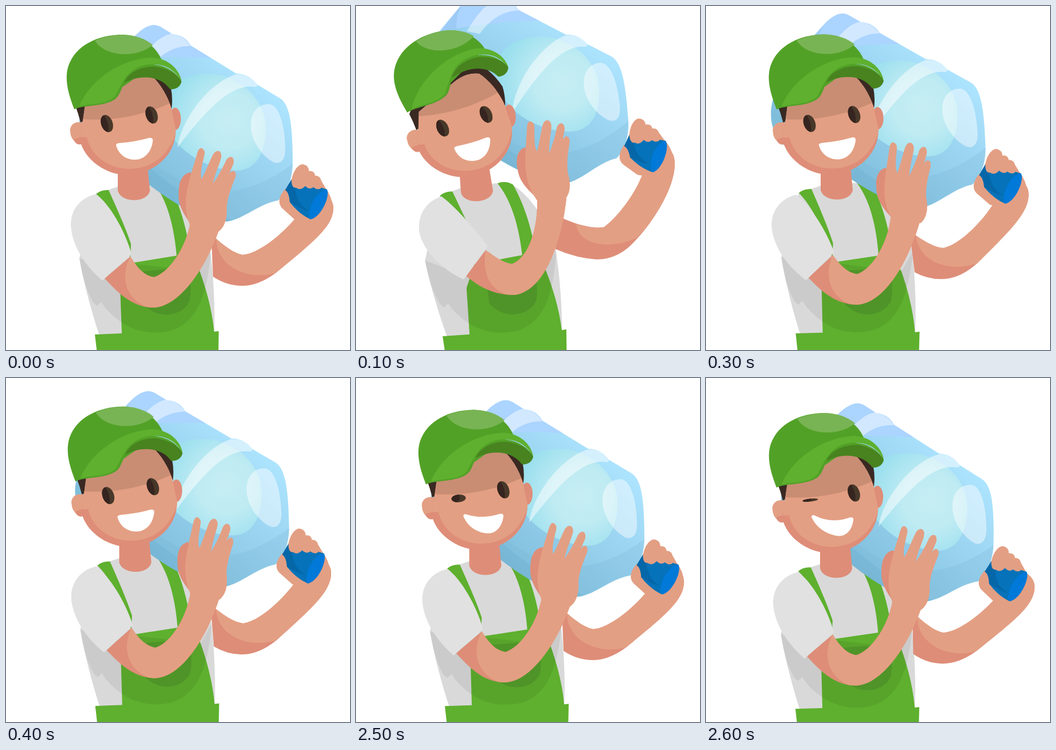
Animation, 600 px wide and 600 px high, one loop 2700 ms. Source, as an HTML page:

```html
<!DOCTYPE html>
<html lang="en">
<head>
<meta charset="utf-8">
<title>Water delivery</title>
<style>
html, body { margin: 0; width: 100%; height: 100%; overflow: hidden; background: #fff; }
svg { display: block; width: 100%; height: 100%; }
.skin { fill: #e39f83; }
.blush { fill: #de8d78; }
.green { fill: #5eb02e; }
.hair { fill: #3a2922; }
</style>
</head>
<body>
<svg viewBox="0 0 600 600">
  <defs>
    <linearGradient id="water" gradientUnits="userSpaceOnUse" x1="455" y1="130" x2="270" y2="330">
      <stop offset="0" stop-color="#aee5ff"/><stop offset=".4" stop-color="#9cd5f2"/><stop offset="1" stop-color="#7fbedb"/>
    </linearGradient>
    <radialGradient id="core" gradientUnits="userSpaceOnUse" cx="390" cy="200" r="110">
      <stop offset="0" stop-color="#c6edf3"/><stop offset=".45" stop-color="#bfebf3"/><stop offset="1" stop-color="#99dfee"/>
    </radialGradient>
    <clipPath id="bottleClip"><use href="#bottleShape"/></clipPath>
    <clipPath id="faceClip"><use href="#faceShape"/></clipPath>
    <clipPath id="eyeClip"><ellipse rx="10" ry="15.5"/></clipPath>
    <g id="eye">
      <ellipse rx="10" ry="15.5" fill="#483829"/>
      <path clip-path="url(#eyeClip)" d="M-12,-16 L0,-16 Q5,2 -4,16 L-12,16Z" fill="#35241f"/>
    </g>
  </defs>

  <g id="torso">
    <path fill="#d9d9d9" d="M157,328 L195,315 L255,309 L283,312 C318,333 345,385 356,425 C362,470 365,530 363,575 L163,575 C148,530 135,480 128,440Z"/>
    <path class="green" d="M157,328 Q166,320 179,321 C192,350 208,385 218,415 L217,440 C203,395 180,350 157,328Z"/>
    <path class="green" d="M258,309 Q272,304 285,312 C303,345 318,395 322,442 L298,440 C295,400 286,345 258,309Z"/>
    <path class="green" d="M199,490 L214,449 L300,435 L337,460 C351,498 360,535 363,568 L371,567 L370,640 L163,640 L155,573 L202,571Z"/>
    <path fill="#000" opacity=".065" d="M128,440 L200,470 L214,449 L338,462 L357,428 C351,510 330,555 285,567 C250,574 222,566 202,552 Q178,536 166,516 L159,523 L152,517 C140,495 132,470 128,440Z"/>
    <path fill="#4f9428" d="M232,464 Q275,458 320,458 Q324,500 320,515 C305,545 260,546 238,518Z"/>
  </g>

  <g id="bottle">
    <path id="bottleShape" fill="url(#water)" d="M184,95 L224,53 Q250,26 269,36 L290,49 Q312,51 322,69 L402,118 Q424,118 438,137 L478,161 C497,173 500,215 500,277 Q498,318 475,339 C440,345 415,372 385,376 C345,372 305,354 250,312 L150,260 C115,225 118,170 184,95Z"/>
    <g clip-path="url(#bottleClip)">
      <path fill="#abd4ff" d="M100,99 L184,97 Q280,85 365,91 L340,0 L100,0Z"/>
      <path fill="#8bbfe8" opacity=".45" d="M184,97 L225,53 Q212,72 212,94Z"/>
      <path fill="#77b4d2" opacity=".25" d="M230,255 C300,310 340,323 385,323 C430,320 470,298 505,272 L505,400 L200,400Z"/>
      <path fill="#66a9c7" opacity=".25" d="M220,255 C280,310 330,345 400,376 L300,390 L200,320Z"/>
    </g>
    <path fill="url(#core)" d="M278,165 C285,125 330,115 365,119 C410,125 455,165 453,215 C452,265 430,288 400,287 C350,287 262,240 278,165Z"/>
    <g fill="#fff">
      <path opacity=".5" d="M299,247 C306,195 358,131 402,119 Q424,118 438,137 Q439,142 432,141 C392,136 350,180 299,247Z"/>
      <path opacity=".45" d="M230,100 Q262,52 290,48 Q311,52 322,70 C295,69 272,82 252,106Z"/>
      <path opacity=".45" d="M458,171 C478,171 487,215 487,250 C487,270 478,276 468,273 C452,266 427,240 427,208 C427,185 440,171 458,171Z"/>
    </g>
  </g>

  <g id="backArm"><path class="blush"/><path class="skin"/></g>
  <g id="fist">
    <path class="skin" d="M486,320 C475,333 474,345 482,353 L504,373 L540,385 L570,352 Q569,333 557,317 L549,303 L510,300Z"/>
    <path fill="#0572b9" d="M499,301 L487,321 Q494,325 495,342 Q510,362 531,372 L560,320Z"/>
    <path fill="#0567a8" d="M499,301 L487,321 Q494,325 495,342 Q515,355 528,357 Q500,342 505,302Z"/>
    <path fill="#0079d8" d="M531,372 C522,362 539,321 560,320 C566,333 548,370 531,372Z"/>
    <path class="skin" d="M498,304 C500,290 508,277 517,276 C526,277 529,284 528,288 C535,287 539,291 539,296 C546,295 551,302 549,307 Q554,313 549,318 C544,321 540,319 536,316 C530,321 525,317 522,314 C514,322 509,319 506,317 Q498,318 498,304Z"/>
  </g>

  <path id="neck" class="blush" d="M195,280 L195,322 C200,344 247,344 251,322 L247,280Z"/>
  <g id="head">
    <path class="skin" d="M136,204 C119,198 110,210 112,219 C113,232 119,234 121,238 L145,230Z"/>
    <path class="blush" d="M118,233 Q127,228 142,229 L138,238 Q127,245 121,238Z"/>
    <ellipse class="blush" cx="295" cy="197" rx="10" ry="19.5"/>
    <path class="hair" d="M121,174 Q126,187 130,203 L135,201 L150,185 L285,180 L289,178 Q291,160 288,145 Q270,110 240,95 L150,120Z"/>
    <path id="faceShape" class="blush" d="M138,172 L134,200 Q128,220 130,238 C139,268 172,294 212,295 C258,293 297,260 296,215 L288,177 C281,155 268,133 250,118 Q225,112 198,132Z"/>
    <path class="skin" clip-path="url(#faceClip)" d="M130,190 L130,229 L141,229 C148,262 180,284 215,284 C258,284 290,255 298,212 L290,100 L130,100Z"/>
    <g clip-path="url(#faceClip)"><path id="shade" fill="#000" opacity=".115" d="M120,196 C180,204 245,191 300,163 L300,80 L120,80Z"/></g>
    <use id="wink" href="#eye"/>
    <use href="#eye" transform="translate(254 190) rotate(-20)"/>
    <path id="mouth" fill="#fff"/>
  </g>
  <g id="cap">
    <path fill="#52a127" d="M119,180 C107,150 102,125 109,104 C121,69 160,50 203,50 C240,52 262,72 271,93 L205,140Z"/>
    <path fill="#78b453" d="M155,60 C172,89 228,92 256,68 C240,54 217,50 203,50 Q177,51 155,60Z"/>
    <path fill="#52a127" d="M118,180 L128,174 L195,140 L250,102 L306,132 L260,112 L206,134 C199,150 197,160 186,165 C165,176 140,172 118,180Z"/>
    <path class="green" d="M128,175 C143,135 195,92 255,90 C289,92 305,117 306,132 C295,111 277,100 250,102 C211,106 204,134 190,158 C174,173 150,169 128,175Z"/>
    <path fill="#52a127" d="M190,158 C204,134 211,106 250,102 C282,101 300,120 306,132 L260,112 L206,134Z"/>
    <path fill="#48831f" d="M206,134 C213,115 238,104 262,106 C290,111 302,123 306,132 C304,141 296,146 286,145 C272,124 238,117 206,134Z"/>
  </g>

  <g id="frontArm"><path class="blush"/><path class="skin"/></g>
  <path id="sleeve" fill="#e1e1e1"/>
  <g id="hand">
    <path class="blush" d="M322,290 C305,293 300,310 301,335 C303,355 318,375 328,388 L335,320Z"/>
    <path class="skin" d="M328,398 C312,368 312,345 315,325 C319,302 327,280 334,255 Q338,245 343,249 Q348,253 346,260 C342,278 338,292 341,302 C347,292 354,273 361,259 Q367,250 373,254 Q377,258 375,266 C370,282 364,294 361,310 C369,298 378,283 384,269 Q389,261 395,264 Q399,269 396,277 L389,293 Q395,285 399,289 Q402,291 400,299 C394,315 387,330 385,350 Q387,382 370,394Z"/>
  </g>
</svg>
<script>
const el = id => document.getElementById(id);

const pivots = {
  torso: [263, 570], bottle: [400, 200], fist: [525, 338], neck: [223, 322], head: [215, 197],
  shade: [0, 0], cap: [212, 156], hand: [354, 298], frontArm: [0, 0], sleeve: [0, 0], backArm: [361, 440]
};

// Limb outlines: resting, then fully raised.
const limbs = {
  sleeve: [[
    'M157,328 C135,333 113,350 113,382 C115,420 140,455 168,479 L219,433 C207,390 180,345 157,328Z',
    'M149,332 C125,340 108,360 110,392 C115,425 150,460 188,477 L230,418 C210,395 180,355 149,332Z'
  ]],
  frontArm: [[
    'M172,475 C195,500 220,526 258,526 C300,524 345,465 371,392 L322,375 C315,420 285,465 258,473 C240,470 228,455 217,437Z',
    'M192,471 C215,490 240,504 275,504 C325,500 358,420 367,335 L316,335 C318,390 300,440 272,450 C255,448 240,435 226,426Z'
  ], [
    'M217,437 C203,462 200,505 245,525 Q252,526 258,526 C300,524 345,465 371,392 L322,375 C315,420 285,465 258,473 C240,470 228,455 217,437Z',
    'M226,426 C222,455 225,490 262,503 Q269,504 275,504 C325,500 358,420 367,335 L316,335 C318,390 300,440 272,450 C255,448 240,435 226,426Z'
  ]],
  backArm: [[
    'M358,398 L368,407 C385,422 400,432 413,434 C440,432 480,400 504,371 L530,345 L556,328 Q571,338 571,352 C571,385 535,412 470,466 Q440,488 412,488 Q385,488 361,472Z',
    'M350,366 L362,371 C390,383 412,388 432,386 C455,370 485,330 497,300 L515,265 L541,245 Q556,255 556,275 C556,320 515,380 490,406 Q460,442 420,442 Q385,440 348,424Z'
  ], [
    'M367,407 C385,422 400,432 413,434 C440,432 480,400 504,371 L530,345 L556,328 Q571,338 571,352 C571,385 535,412 470,466 C415,480 367,450 367,407Z',
    'M384,380 C400,386 412,388 432,386 C455,370 485,330 497,300 L515,265 L541,245 Q556,255 556,275 C556,320 515,380 490,404 C440,428 387,415 384,380Z'
  ]]
};
const mouths = [
  'M192,243 Q191,240 198,239 Q225,237 250,230 Q257,229 256,236 C253,258 238,269 224,268 C208,268 196,258 192,243Z',
  'M180,232 Q181,226 187,230 Q215,244 246,233 Q254,231 253,238 C250,256 240,266 226,265 C205,262 188,250 180,232Z'
];

// Each part: dx, dy, rotation, vertical scale. Eye: x, y, rotation, scaleX, scaleY.
const rest = {
  torso: [0, 0, 0, 1], bottle: [0, 0, 0, 1], fist: [0, 0, 0, 1], neck: [0, 0, 0, 1], head: [0, 0, 0, 1],
  shade: [0, 0, 0, 1], cap: [0, 0, 0, 1], hand: [0, 0, 0, 1],
  frontArm: [0, 0, 0, 1], sleeve: [0, 0, 0, 1], backArm: [0, 0, 0, 1],
  bend: [0, 0], smile: [0], eye: [176, 205, -20, 1, 1]
};
const raised = { ...rest,
  torso: [-4, 0, -1.6, 1], bottle: [-30, -68, -4, 1], fist: [-17.5, -81, -6.5, 1], neck: [-12, 2, -4, 1],
  head: [-26, 3.5, -6.6, 1], shade: [0, -18, 0, 1], cap: [-35, -9.5, -9.7, 1], hand: [-26.5, -51, -13, 1],
  bend: [1, 1]
};
const settling = { ...rest,
  torso: [1.5, -.5, .8, 1], bottle: [-15, -25, -2, 1], fist: [-10, -27, -1.5, 1], neck: [5, -1, 0, 1],
  head: [4.5, -.5, -.5, 1], cap: [4, -.5, -.5, 1], hand: [-8, -12.5, -8, 1],
  frontArm: [2, 0, 0, 1], sleeve: [2, 0, 0, 1], backArm: [1, -5, -5, 1], bend: [.23, .05]
};
const halfWink = { ...rest,
  torso: [0, .3, .5, .98], bottle: [3, 5.5, 0, 1], fist: [2.5, 5.5, 0, 1], neck: [2.5, 5, 0, 1],
  head: [3, 5, 0, 1], cap: [3, 5.5, 0, 1], hand: [3, 5, 0, 1],
  frontArm: [2.5, 5, 0, 1], sleeve: [2.5, 5, 0, 1], backArm: [1, 4, 0, 1],
  smile: [.65], eye: [176, 205, -5, 1.25, .43]
};
const wink = { ...rest,
  torso: [1, 5.5, .7, .98], bottle: [3, 14, 1.2, 1], fist: [-1, 17.5, 1, 1], neck: [4, 10, 0, 1],
  head: [4, 10.5, 0, 1], cap: [4, 11, 0, 1], hand: [5, 10.5, 0, 1],
  frontArm: [4, 10.5, 0, 1], sleeve: [4, 10.5, 0, 1], backArm: [1, 9.5, .8, 1],
  smile: [1], eye: [178, 202.5, -6, 1.35, .17]
};

const mix = (a, b, k) => a + (b - a) * k;
const mixPose = (a, b, k) => Object.fromEntries(
  Object.keys(a).map(key => [key, a[key].map((v, i) => mix(v, b[key][i], k))]));
const morph = ([a, b], k) => {
  const number = /-?[\d.]+/g, ends = b.match(number);
  let i = 0;
  return a.replace(number, v => mix(+v, +ends[i++], k).toFixed(2));
};

function show(pose) {
  for (const [id, [px, py]] of Object.entries(pivots)) {
    const [dx, dy, angle, scale] = pose[id];
    el(id).setAttribute('transform',
      `translate(${px + dx} ${py + dy}) rotate(${angle}) scale(1 ${scale}) translate(${-px} ${-py})`);
  }
  for (const [id, shapes] of Object.entries(limbs)) {
    const paths = id === 'sleeve' ? [el(id)] : el(id).children;
    const bend = pose.bend[id === 'backArm' ? 1 : 0];
    shapes.forEach((shape, i) => paths[i].setAttribute('d', morph(shape, bend)));
  }
  el('mouth').setAttribute('d', morph(mouths, pose.smile[0]));
  const [x, y, angle, sx, sy] = pose.eye;
  el('wink').setAttribute('transform', `translate(${x} ${y}) rotate(${angle}) scale(${sx} ${sy})`);
}

const steps = {
  1: raised, 2: mixPose(raised, settling, .5), 3: settling, 4: mixPose(settling, rest, .5),
  25: halfWink, 26: wink
};
const start = performance.now();
let shown;
function tick() {
  const step = Math.floor((performance.now() - start) % 2700 / 100);
  const pose = steps[step] || rest;
  if (pose !== shown) show(shown = pose);
  requestAnimationFrame(tick);
}
tick();
</script>
</body>
</html>
```
